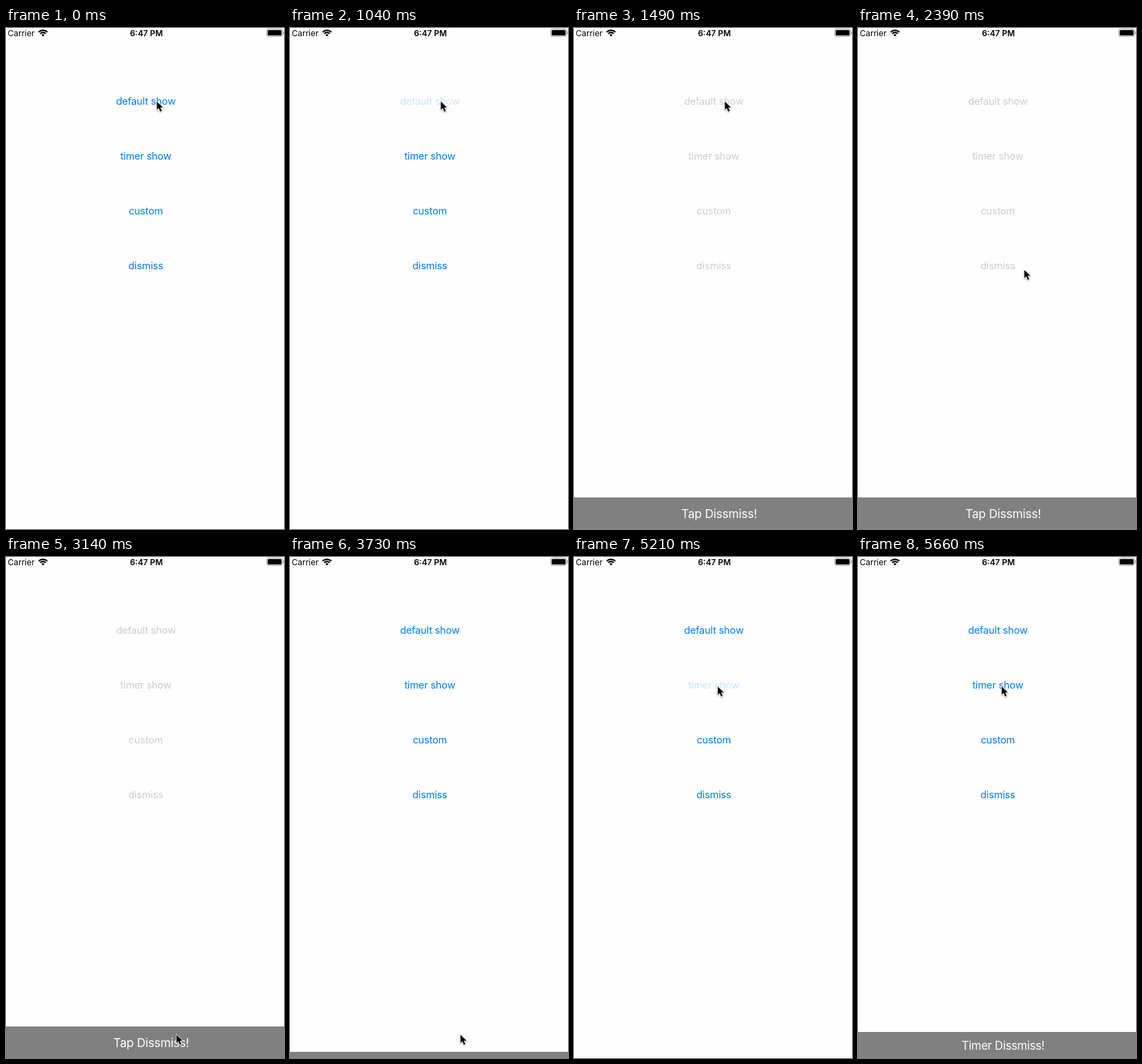
These frames come from a looping animation (406 by 731 pixels, 8000 ms). An HTML page:

```html
<!DOCTYPE html>
<html lang="en">
<head>
<meta charset="utf-8">
<title>Bottom bar demo</title>
<style>
  html, body { margin: 0; width: 100%; height: 100%; overflow: hidden; background: #fefefe; }
  svg { display: block; width: 406px; height: 731px; }
  text { font-family: Inter, Roboto, "Liberation Sans", sans-serif; }
  #menu text { font-size: 14.7px; letter-spacing: -.19px; text-anchor: middle; }
  #bar text { fill: #fff; text-anchor: middle; }
  #tap { font-size: 17.4px; letter-spacing: -.2px; }
  #timer { font-size: 16.7px; letter-spacing: -.25px; }
  #status text { font-size: 12px; }
  #pointer { filter: drop-shadow(0 1px 1px rgba(0, 0, 0, .35)); }
</style>
</head>
<body>
<svg viewBox="0 0 406 731">
  <g id="status">
    <text x="2.5" y="12">Carrier</text>
    <g fill="none" stroke="#000" stroke-width="2.2">
      <path d="M47.64 5.94A9 9 0 0 1 60.36 5.94"/>
      <path d="M50.04 8.34A5.6 5.6 0 0 1 57.96 8.34"/>
      <path d="M51.88 10.18A3 3 0 0 1 56.12 10.18L54 12.3Z" fill="#000" stroke="none"/>
    </g>
    <text x="205" y="12" font-weight="600" text-anchor="middle">6:47 PM</text>
    <rect x="380.5" y="1.5" width="23.5" height="11" rx="3" fill="none" stroke="#a0a0a0"/>
    <rect x="382" y="3" width="20.5" height="8" rx="1.6"/>
    <path d="M405 5q1.4 .5 1.4 2t-1.4 2z" fill="#a0a0a0"/>
  </g>
  <g id="menu">
    <text>default show</text>
    <text>timer show</text>
    <text>custom</text>
    <text>dismiss</text>
  </g>
  <g id="bar">
    <rect width="406" height="60" fill="#808080"/>
    <text id="tap" x="212" y="30">Tap Dissmiss!</text>
    <text id="timer" x="211.8" y="26">Timer Dissmiss!</text>
  </g>
  <g id="pointer">
    <path d="M.6 .5V12.5L3.4 9.9L5.6 15.1L7.8 14.2L5.6 9.2H9.5Z"
          stroke="#fff" stroke-width="1.6" stroke-linejoin="round" paint-order="stroke"/>
  </g>
</svg>
<script>
  // The picture changes only on a fixed beat; all times below count beats.
  const LOOP = 8000, BEAT = 1040 / 7, BOTTOM = 731;
  const PRESS_TAP = 7, CLOSE_TAP = 23.35, PRESS_TIMER = 35;

  const $ = id => document.getElementById(id);
  const items = [...$('menu').children];
  items.forEach((item, i) => {
    item.setAttribute('x', 204.2);
    item.setAttribute('y', 112.2 + 80 * i);
  });

  const progress = (now, from, length) =>
    Math.min(1, Math.max(0, (now - from) / length));
  const smooth = u => u * u * (3 - 2 * u);
  const settle = u => 1 - (1 - u) ** 2.6;

  const bezier = (a, b, c, d, u) => {
    const v = 1 - u;
    return v ** 3 * a + 3 * v * v * u * b + 3 * v * u * u * c + u ** 3 * d;
  };

  // Pointer strokes: start, two handles, end.
  const down = { from: 15, path: [[219.7, 106.8], [234, 380], [275, 460], [248.3, 696.5]] };
  const up = { from: 27, path: [[248.3, 696.5], [308, 171], [270, 109], [209.3, 188.5]] };

  function pointerAt(now) {
    const { from, path } = now < up.from ? down : up;
    const u = settle(progress(now, from, 6));
    return [0, 1].map(axis => bezier(...path.map(p => p[axis]), u));
  }

  function barTop(now) {
    const slide = (from, length) => smooth(progress(now, from, length));
    const tap = slide(PRESS_TAP, 2.3) - slide(CLOSE_TAP, 2.3);
    const timer = slide(PRESS_TIMER + .4, 1.7);
    return Math.round(BOTTOM - 46 * tap - 38 * timer);
  }

  // A pressed item dims at once, then fades back.
  function pressed(now, from, length) {
    return now < from ? 1 : .2 + .8 * progress(now, from, length) ** 2;
  }

  function move(el, x, y) {
    el.setAttribute('transform', `translate(${x} ${y})`);
  }

  function draw(t) {
    const now = Math.floor(t / BEAT + 1e-6);
    const open = now > PRESS_TAP && now < CLOSE_TAP;
    const timed = now >= PRESS_TIMER;
    move($('pointer'), ...pointerAt(now));
    move($('bar'), 0, barTop(now));
    $('tap').setAttribute('visibility', timed ? 'hidden' : 'visible');
    $('timer').setAttribute('visibility', timed ? 'visible' : 'hidden');
    $('menu').setAttribute('fill', open ? '#cccccc' : '#007aff');
    items[0].setAttribute('opacity', pressed(now, PRESS_TAP, 2));
    items[1].setAttribute('opacity', pressed(now, PRESS_TIMER, 3));
  }

  const start = performance.now();
  function tick() {
    draw((performance.now() - start) % LOOP);
    requestAnimationFrame(tick);
  }
  tick();
</script>
</body>
</html>
```
